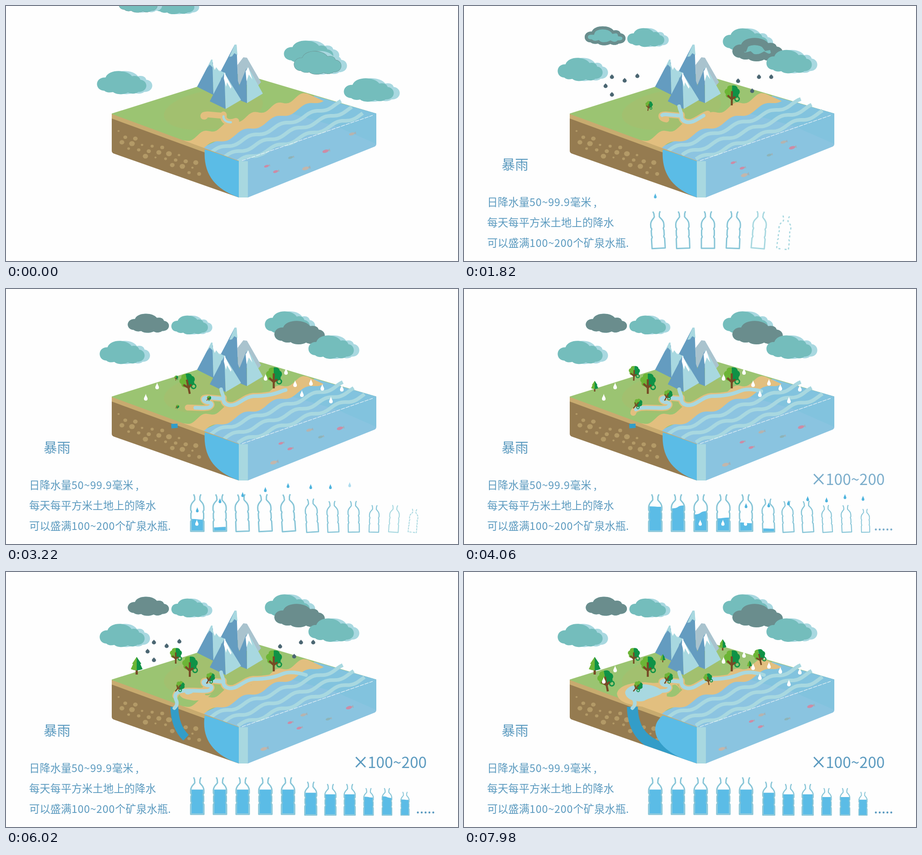
An HTML page that plays this animation: 996 px wide and 562 px high, repeating every 8000 ms.

```html
<!DOCTYPE html>
<html lang="zh">
<head>
<meta charset="utf-8">
<title>暴雨</title>
<style>
html, body { margin: 0; width: 100%; height: 100%; overflow: hidden; background: #fefefe; }
svg { display: block; width: 100vw; height: 100vh; }
text { font-family: "Noto Sans CJK SC", "Noto Sans CJK", "Noto Sans CJK JP", "Noto Sans", sans-serif; font-weight: 500; }
</style>
</head>
<body>
<svg id="stage" viewBox="0 0 996 562"></svg>
<script>
const LOOP = 8000, STEP = 70;
const C = {
  teal: '#74bdbc', pale: '#a8d8e0', storm: '#6a8d8d', grass: '#9bc472', sand: '#e2bf7f',
  soil: '#957b50', stone: '#b39a67', sea: '#8ac4e0', water: '#5bbce6', deep: '#339dc8', rock: '#649cc0',
  leaf: '#6cb536', leafDark: '#0f9246', trunk: '#774a25', ink: '#5b9abf', glass: '#87c5d7'
};

const clamp = v => Math.max(0, Math.min(1, v));
const span = (t, a, b) => clamp((t - a) / (b - a));
const mix = (a, b, p) => a + (b - a) * p;
const easeOut = (u, power = 2) => 1 - (1 - u) ** power;
const smooth = u => u * u * (3 - 2 * u);
const backOut = (u, c) => 1 + (c + 1) * (u - 1) ** 3 + c * (u - 1) ** 2;
const range = (n, f) => Array.from({ length: n }, (_, i) => f(i));

const path = (d, fill, more = '') => `<path d="${d}" fill="${fill}" ${more}/>`;
const poly = (pts, fill) => `<polygon points="${pts}" fill="${fill}"/>`;
const place = (x, y, s, r, inner, o = 1) =>
  `<g transform="translate(${x} ${y}) rotate(${r}) scale(${s})" opacity="${o}">${inner}</g>`;

// The stretch of a curve between two lengths, out of a total of len.
const stretch = (d, len, from, to, color, width, cap = 'round') => to <= from ? '' :
  path(d, 'none', `pathLength="${len}" stroke="${color}" stroke-width="${width}" stroke-linejoin="round"
    stroke-linecap="${cap}" stroke-dasharray="${to - from} 999" stroke-dashoffset="${-from}"`);

// A sloping line with ripples that lie level around x = flat.
const ripple = (x0, y0, x1, y1, flat, period, height = 4) => range(61, k => {
  const x = mix(x0, x1, k / 60);
  const y = mix(y0, y1, k / 60) + height * Math.sin((x - flat) / period * 2 * Math.PI);
  return `${x.toFixed(1)},${y.toFixed(1)}`;
});

/* ---------- block ---------- */
const FACE = 'M233 240L513 342V422L237 325Q233 323 233 319Z';
const SHORE = [...ripple(390, 298, 664, 193, 448, 54, 5), ...ripple(430, 315, 700, 205, 540, 69, 5).reverse()].join(' ');
const BAND = 'M371 297C372 345 393 368 420 381C440 391 465 400 497 414';
const STONES = range(25, i => {
  const x = 248 + 7.4 * i, depth = 30 + 36 * (i * .618 % 1), r = 2.2 + 4.3 * (i * .73 % 1);
  return `<ellipse cx="${x}" cy="${240 + (x - 233) * .364 + depth}" rx="${r}" ry="${r * .9}" fill="${C.stone}"/>`;
}).join('');

function block(t) {
  const sway = 2.5 * Math.sin(t / 420), rise = 4 * (1 - span(t, 0, 700));
  const waves = range(3, i => {
    const pts = ripple(450 + 30.5 * i, 319 + 10 * i + rise, 742 + 24 * i - rise, 209 + 12.5 * i + rise, 487 + 28 * i + sway, 68);
    return `<polyline points="${pts.join(' ')}" fill="none" stroke="${C.pale}" stroke-width="8"/>`;
  }).join('');
  const bulge = span(t, 5040, 7980) ** 2;
  const bank = `${mix(434, 396, bulge)} ${mix(372, 350, bulge)} ${mix(462, 438, bulge)} 404`;
  const band = 5 * span(t, 2700, 3200) + 95 * span(t, 5040, 7700);
  return poly('233,237 516,148 816,237 533,342 513,342 233,240', C.grass) +
    '<ellipse cx="457" cy="228" rx="110" ry="43" fill="#a2c06f" transform="rotate(-8 457 228)"/>' +
    poly('430,313 680,198 816,237 533,343 513,343', '#8cc4e1') +
    poly('622,235 690,201 816,237 734,267', '#82c3de') + poly(SHORE, C.sand) + waves +
    path(FACE, C.soil) + poly('233,238 513,341 513,350 233,248', '#c8ab6f') + STONES +
    `<clipPath id="face"><path d="${FACE}"/></clipPath><g clip-path="url(#face)">` +
    stretch(BAND, 100, 0, band, C.deep, 14 + 10 * span(t, 5040, 7980), 'butt') +
    path(`M438 316C${bank} 513 422V340Z`, C.water) + '</g>' +
    path('M513 342H534V422H513Z', C.pale) +
    path('M533 342L816 237V304Q816 308 812 310L533 422Z', C.sea) +
    path('M734 268L816 237V304Z', '#82c3de') +
    '<path d="M520 341L808 241" stroke="#fff" stroke-dasharray="9 2"/>';
}

/* ---------- mountains ---------- */
const MOUNTAINS =
  poly('523,113 531,114 562,168 555,176 511,172 510,130', '#a9c3ce') +
  poly('504,85 508,85 511,165 525,207 470,192 470,150', C.rock) +
  poly('504,85 508,85 510,108 503,104 498,111 492,112', C.pale) +
  poly('452,119 421,178 457,196 456,125', C.rock) +
  poly('452,118 455,118 456,136 449,129 443,137', C.pale) +
  poly('455,127 460,141 463,135 476,151 466,196 457,195', C.pale) +
  poly('470,142 484,148 478,166', C.pale) +
  poly('530,137 510,185 516,208 531,214', C.rock) +
  poly('531,134 540,146 566,193 531,214', C.pale) +
  poly('528,144 534,135 543,162 535,151 530,166', '#fff') +
  poly('481,148 449,210 484,227', C.rock) + poly('481,147 518,207 484,227', C.pale) +
  poly('481,146 497,178 495,182 487,168 485,178 480,160', '#fff');

/* ---------- river ---------- */
const EAST = 'M474 221C476 232 481 236 479 245C482 258 498 259 510 252C525 244 530 238 545 236C565 236 590 233 608 225C625 218 645 222 661 227';
const WEST = 'M479 242L445 239C430 238 433 250 448 250C458 253 452 262 440 262C420 263 405 260 390 262C372 265 370 272 376 285C378 293 374 297 371 300';
const BASIN = path('M-93 0C-90 -18 -60 -25 -30 -25C-5 -22 10 -23 10 -33C30 -28 50 -18 45 -6C40 7 30 17 10 27L-30 30C-60 25 -90 22 -93 0Z', C.sand) +
  path('M17 6C16 -6 22 -18 35 -20C48 -13 48 -3 40 2C34 8 24 8 17 6Z', C.grass);
const POND = path('M-50 0C-48 -16 -20 -20 -2 -18C18 -15 31 -8 32 0C25 8 5 10 -8 18C-25 22 -48 16 -50 0Z', C.pale);

function river(t) {
  const east = mix(48, 226, smooth(span(t, 700, 4500)));
  const west = 178 * span(t, 900, 4900);
  const start = span(t, 0, 600);
  return place(430, 268, easeOut(span(t, 5200, 7900)), 0, BASIN) +
    `<circle cx="437" cy="242" r="8.5" fill="${C.sand}"/>` +
    stretch(EAST, 226, 20, Math.max(60, Math.min(170, east + 10)), C.sand, 14) +
    stretch(WEST, 178, 0, Math.max(44, Math.min(150, west + 16)), C.sand, 13) +
    place(405, 266, span(t, 5500, 7980), 0, POND) +
    stretch(EAST, 226, 24 * (1 - start), east, C.pale, 5 + 3 * start) +
    stretch(WEST, 178, 0, west, C.pale, 8);
}

/* ---------- trees ---------- */
const OAK =
  path('M0 -46C-8 -47 -12 -43 -11 -39C-18 -37 -19 -29 -14 -26C-16 -18 -8 -15 0 -18Z', C.leaf) +
  path('M0 -46C9 -47 13 -43 13 -39C20 -36 19 -28 15 -25C17 -18 8 -15 0 -18Z', C.leafDark) +
  `<circle cx="12" cy="-15" r="5" fill="none" stroke="${C.leafDark}" stroke-width="3"/>` +
  path('M-10 -23L0 -14L8 -20M0 0V-33', 'none', `stroke="${C.trunk}" stroke-width="4.5"`);
const PINE_HALF = 'M0 -39L-10 -24L-8 -23L-13 -12Q-6 -9 0 -9Z';
const PINE = path('M-2.5 0V-14H2.5V0Z', C.trunk) + path(PINE_HALF, C.leaf) +
  `<g transform="scale(-1 1)">${path(PINE_HALF, C.leafDark)}</g>`;

// A tree grows quickly; an oak rocks once from side to side as it does.
function tree(t, shape, x, y, size, born, tilt = 0) {
  if (t <= born) return '';
  const rock = shape === OAK ? 12 * Math.sin(2 * Math.PI * span(t, born, born + 2400)) : 0;
  return place(x, y, size * easeOut(span(t, born, born + 1500)), tilt + rock, shape);
}
const trees = t =>
  tree(t, PINE, 570, 173, .8, 7150) + tree(t, PINE, 438, 199, .5, 6900) + tree(t, PINE, 629, 212, .54, 7150) +
  tree(t, OAK, 590, 219, 1, 650) + tree(t, OAK, 405, 231, .97, 1400) + tree(t, OAK, 374, 202, .75, 2950) +
  tree(t, PINE, 288, 226, 1, 3500) + tree(t, OAK, 442, 246, .57, 2800, 30) + tree(t, OAK, 373, 263, .57, 2900, 40) +
  tree(t, OAK, 540, 249, .55, 6000) + tree(t, OAK, 655, 205, .76, 6200) + tree(t, OAK, 317, 263, 1, 6300);

/* ---------- fish ---------- */
function fish(t, x, y, dx, dy, size, color, time = LOOP, power = 1.5) {
  const p = easeOut(span(t, 0, time), power);
  return place(x + dx * p, y + dy * p, size, -16,
    `<path d="M3 0L9 -3V3Z" fill="#9fb2bb"/><ellipse rx="6" ry="3" fill="${color}"/>`);
}
const shoal = t =>
  [[574, 353, .9], [594, 365, .95], [704, 320, 1.15]].map(([x, y, s]) => fish(t, x, y, 59, -24, s, '#cc8ca6')).join('') +
  fish(t, 627, 334, 84, -10, .9, '#8db4b8', LOOP, 3) +
  fish(t, 660, 358, -92, 32, 1.25, '#c3b6ab', 4800, 1.3) +
  fish(t, 762, 282, -107, 33, 1.05, '#b5b4b0', 4000, 1.3);

/* ---------- clouds ---------- */
const CLOUD = 'M17 44C-6 43 -5 13 20 14C27 -5 68 -5 80 11C90 9 97 12 99 19C118 21 118 47 94 47C88 52 78 52 71 48C62 53 45 54 37 47C30 49 22 48 17 44Z';

// Storm clouds lose their pale shade and darken from the rim inwards.
function cloud(t, from, to, size, ease, stormPower) {
  const p = ease(t), drift = clamp(p), storm = stormPower > 0;
  const squash = storm ? mix(.95, 1.01, drift) : mix(1, .91, drift);
  const rim = storm ? path(CLOUD, 'none', `stroke="${C.storm}" clip-path="url(#puff)"
    stroke-width="${1.2 + 60 * span(t, 770, 2800) ** stormPower}"`) : '';
  return place(mix(from[0], to[0], drift), mix(from[1], to[1], p), `${size * squash} ${size}`, 0,
    path(CLOUD, C.pale, `transform="translate(13.5 0)" opacity="${storm ? 1 - span(t, 900, 1700) : 1}"`) +
    path(CLOUD, C.teal) + rim);
}
const bounce = t => backOut(span(t, 0, 1600), 3);
const late = t => backOut(span(t, 400, 3000), 1.7);
const glide = t => easeOut(span(t, 300, 3300), 3);

const sky = t => `<clipPath id="puff"><path d="${CLOUD}"/></clipPath>` +
  cloud(t, [326, -23], [364, 59], .79, glide) +
  cloud(t, [248, -27], [268, 55], .8, glide, 2) +
  cloud(t, [200, 144], [206, 115], .97, bounce) +
  cloud(t, [612, 77], [570, 50], .97, bounce) +
  cloud(t, [634, 100], [591, 71], .98, bounce, 1) +
  cloud(t, [744, 160], [666, 103], .98, late);

/* ---------- rain ---------- */
const DROP = 'M0 -8C1 -3 4 0 4 3A4 4 0 0 1 -4 3C-4 0 -1 -3 0 -8Z';
const BEAD = 'M0 -5.5C.5 -3 4.5 -2 4.5 1.2A4.5 4 0 0 1 -4.5 1.2C-4.5 -2 -.5 -3 0 -5.5Z';
const HIGH = [[326,147],[354,155],[382,145],[312,167],[326,186],[604,156],[650,147],[677,147],[635,178]];
const LOW = [[308,239],[333,214],[572,195],[617,182],[637,209],[672,206],[697,217],[652,231],[740,219],[716,245]];

function rain(t) {
  const age = t < 400 ? -1 : (t - 400) % 4400;
  const sink = -8 + 18 * easeOut(span(age, 0, 2000)), fall = -30 * (1 - span(age, 2400, 2800));
  const dark = span(age, 0, 650) * (1 - span(age, 2250, 2600));
  const white = span(age, 2300, 2700) * (1 - span(age, 3800, 4300));
  const drops = (spots, dy, shape, o) => o ? spots.map(([x, y]) => place(x, y + dy, 1, 0, shape, o)).join('') : '';
  return drops(HIGH, sink, path(BEAD, '#4b6672'), dark) + drops(LOW, fall, path(DROP, '#fff'), white);
}

/* ---------- bottles ---------- */
const SIZES = [1, 1, 1, 1, 1, .9, .84, .84, .73, .73, .63];
const side = s => `M${8 * s} -83L${6 * s} -78L${5.5 * s} -71C${8 * s} -66 ${14.5 * s} -64 ${14.5 * s} -54V-48` +
  `Q${11.5 * s} -45 ${14 * s} -41V-30Q${11.5 * s} -27 ${14.5 * s} -23V-1.5H0`;
const BOTTLE = side(-1) + side(1);

// Each bottle is sketched in from the right, rocks upright, then fills from a falling drop.
function bottle(t, size, i) {
  const born = 350 + 260 * i, pour = 2750 + 325 * i ** .8, k = Math.max(0, i - 5);
  if (t < born) return '';
  const home = 421.5 + 50 * i - k * (6.2 + .45 * k), age = Math.min(t - born, 2850);
  const x = home + 50 * (1 - .06 * i) * (1 - span(age, 0, 2400)) ** 2;
  const tilt = 7 * Math.cos(age * 2 * Math.PI / 3800) * (1 - age / 4000);
  const level = span(t, pour, pour + 1000), top = -3 - 53 * level;
  const slosh = 5 * Math.sin(t / 130 + i) * level * (1 - span(t, pour + 900, pour + 1900));
  const fill = level ? path(`M-13 -3V${top + slosh}Q-4 ${top + slosh} 0 ${top}T13 ${top - slosh}V-3Z`, C.water) : '';
  const splash = level && level < .95 ? place(-1, -20, .9, 0, path(DROP, '#fff')) : '';
  const drawn = 10 * span(age, 0, 350);
  const line = path(BOTTLE, 'none', `pathLength="200" stroke="${age < 650 ? C.pale : C.glass}" stroke-width="3"
    stroke-linejoin="round" stroke-dasharray="${drawn < 10 ? `${drawn} ${10 - drawn}` : 'none'}"`);
  const p = span(t, pour - 1200, pour + 500);
  const drip = p > 0 && p < 1 ? place(home, 414 + 100 * (1 - size) + 75 * p ** 1.5, .75, 0, path(DROP, '#4fb4de'), clamp(p * 6)) : '';
  return place(x, size < 1 ? 537 : 535.5, size, tilt, fill + splash + line) + drip;
}

/* ---------- words ---------- */
function words(t) {
  const p = span(t, 770, 1650);
  const color = `rgb(${mix(160, 91, p)},${mix(214, 154, p)},${mix(224, 191, p)})`;
  const label = (x, y, size, s) => `<text x="${x}" y="${y}" font-size="${size}">${s}</text>`;
  const digits = s => `<tspan letter-spacing=".8">${s}</tspan>`;
  return `<g fill="${color}" opacity="${span(t, 150, 700)}">` +
    label(83, 360, 29.5, '暴雨') + label(51, 441, 23.3, `日降水量${digits('50~99.9')}毫米 ,`) +
    label(51, 486, 23.3, '每天每平方米土地上的降水') +
    label(51, 531, 23.3, `可以盛满${digits('100~200')}个矿泉水瓶.`) + '</g>' +
    `<g fill="${C.ink}" opacity="${span(t, 3500, 4200)}">` +
    `<path d="M771 408L792 430M792 408L771 430" stroke="${C.ink}" stroke-width="3"/>` +
    label(797, 432, 33.5, '100~200') +
    range(5, i => `<circle cx="${907.5 + 8.5 * i}" cy="530" r="2.2"/>`).join('') + '</g>';
}

const stage = document.getElementById('stage');
let shown = -1;
function frame(now) {
  const t = Math.floor(now % LOOP / STEP) * STEP;
  if (t !== shown) {
    shown = t;
    stage.innerHTML = block(t) + shoal(t) + MOUNTAINS + river(t) + trees(t) + sky(t) + rain(t) +
      SIZES.map((size, i) => bottle(t, size, i)).join('') + words(t);
  }
  requestAnimationFrame(frame);
}
frame(performance.now());
</script>
</body>
</html>
```
